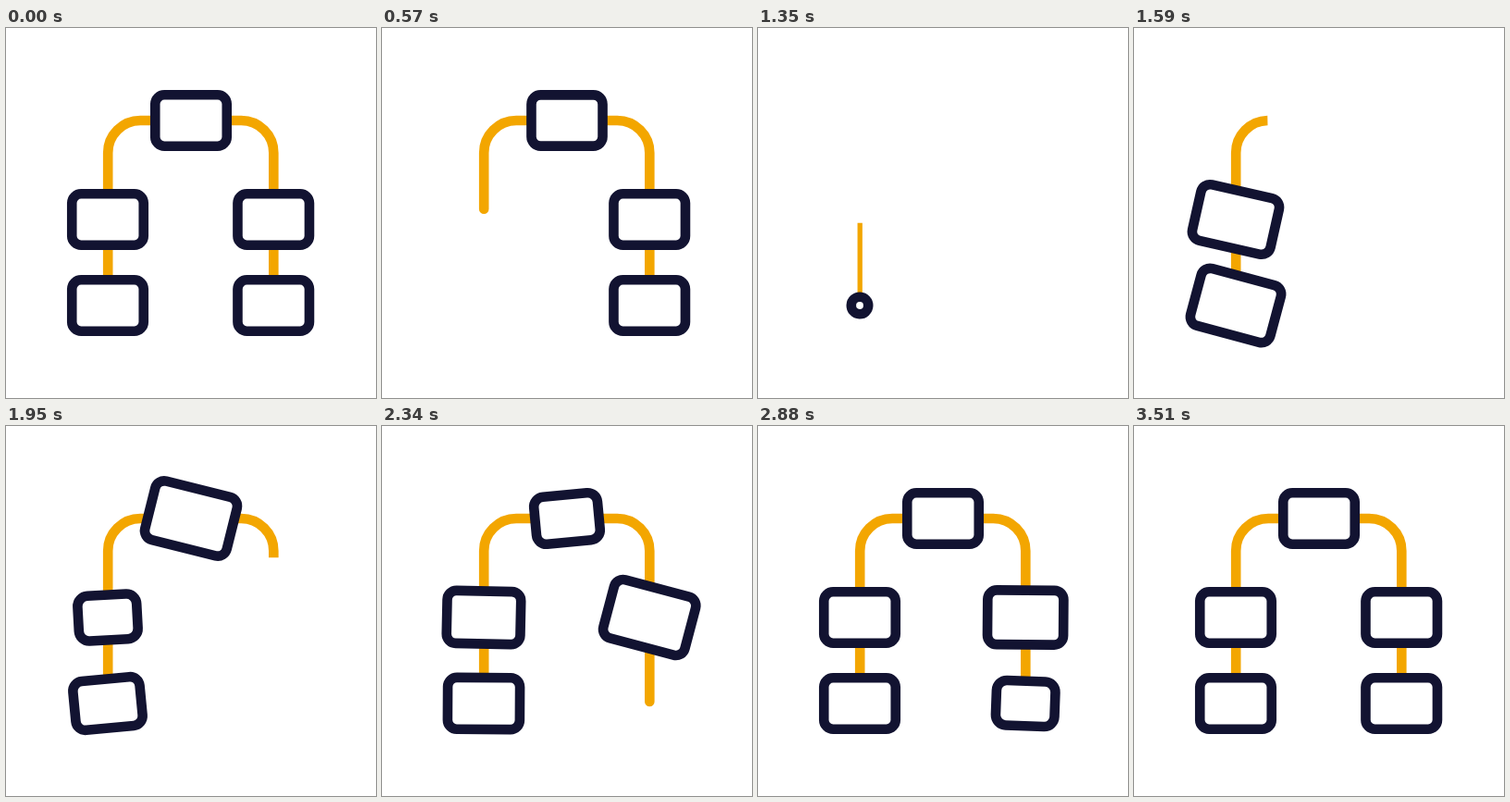
An HTML page that plays this animation: 400x400 px, repeating every 5.63 s.

```html
<!DOCTYPE html>
<html lang="en">
<head>
<meta charset="utf-8">
<title>Tree diagram</title>
<style>
  html, body { margin: 0; width: 100%; height: 100%; overflow: hidden; background: #fff; }
  svg { display: block; width: 100%; height: 100%; }
  .link { fill: none; stroke: #f3a600; }
  .box { fill: #fff; stroke: #121331; }
</style>
</head>
<body>
<svg viewBox="0 0 400 400">
  <path class="link" id="link" pathLength="550"
    d="M110.2 298V135A35 35 0 0 1 145.2 100H254.3A35 35 0 0 1 289.3 135V298"/>
  <g id="boxes"></g>
</svg>
<script>
const LOOP = 5630, STEP = 30, LENGTH = 550;
const W = 77.5, H = 55.5, DOT = 33.5, STROKE = 10.6;
const SHRINK = 330;

// Centre, start of shrinking, start of popping back in
const boxes = [
  { x: 110, y: 300, out: 30, pop: 1270 },
  { x: 110, y: 207, out: 215, pop: 1360 },
  { x: 200, y: 100, out: 545, pop: 1690 },
  { x: 289.2, y: 207, out: 775, pop: 2050 },
  { x: 289.2, y: 300, out: 870, pop: 2360 }
];

// Damped swing: [ms since pop, value]
const scaleKeys = [[0, 0], [270, 1.18], [550, 0.81], [810, 1.06], [1140, 1]];
const turnKeys = [[0, 0], [310, 15], [670, -5.5], [890, 1.7], [1140, 0]];

const link = document.getElementById('link');
const layer = document.getElementById('boxes');
for (const b of boxes) {
  b.el = document.createElementNS('http://www.w3.org/2000/svg', 'rect');
  b.el.setAttribute('class', 'box');
  layer.append(b.el);
}

const clamp = v => Math.min(1, Math.max(0, v));
const progress = (t, start, span) => clamp((t - start) / span);
const ease = u => (1 - Math.cos(Math.PI * u)) / 2;

function set(el, attrs) {
  for (const name in attrs) el.setAttribute(name, attrs[name]);
}

function sample(keys, t) {
  if (t <= keys[0][0]) return keys[0][1];
  for (let i = 1; i < keys.length; i++) {
    const [t0, v0] = keys[i - 1], [t1, v1] = keys[i];
    if (t < t1) return v0 + (v1 - v0) * ease((t - t0) / (t1 - t0));
  }
  return keys[keys.length - 1][1];
}

// Small boxes are round, and widen into rectangles as they grow
function boxHeight(w, s) {
  if (s > 1) return H * s;
  if (w < DOT) return w;
  return DOT + (w - DOT) * (H - DOT) / (W - DOT);
}

function drawBox(b, t) {
  const leaving = t < b.out + SHRINK;
  const s = leaving ? 1 - progress(t, b.out, SHRINK) ** 2 : sample(scaleKeys, t - b.pop);
  const turn = leaving ? 0 : sample(turnKeys, t - b.pop);
  const w = W * s, h = boxHeight(w, s);
  const r = Math.min(10 + 6 * Math.max(0, 1 - s), w / 2, h / 2);
  set(b.el, {
    x: -w / 2, y: -h / 2, width: w, height: h, rx: r,
    'stroke-width': Math.min(STROKE, w * 0.6),
    transform: `translate(${b.x} ${b.y}) rotate(${turn})`,
    visibility: s > 0.01 ? 'visible' : 'hidden'
  });
}

function drawLink(t) {
  let from = 0, to = LENGTH, width;
  if (t < 1170) {
    from = LENGTH * progress(t, 74, 1145) ** 2;
    width = STROKE * (1 - progress(t, 570, 500) ** 2);
  } else {
    const u = progress(t, 1200, 1140);
    to = LENGTH * u * (1 + 0.25 * (1 - u));
    width = STROKE * progress(t, 1200, 300);
  }
  set(link, {
    'stroke-width': width,
    'stroke-dasharray': `${to - from} 2000`,
    'stroke-dashoffset': -from,
    'stroke-linecap': to < 450 ? 'butt' : 'round',
    visibility: width > 0 && to > from ? 'visible' : 'hidden'
  });
}

function draw(now) {
  const t = Math.floor((now % LOOP) / STEP) * STEP;
  drawLink(t);
  for (const b of boxes) drawBox(b, t);
}

const start = performance.now();
function tick() {
  draw(performance.now() - start);
  requestAnimationFrame(tick);
}
tick();
</script>
</body>
</html>
```
